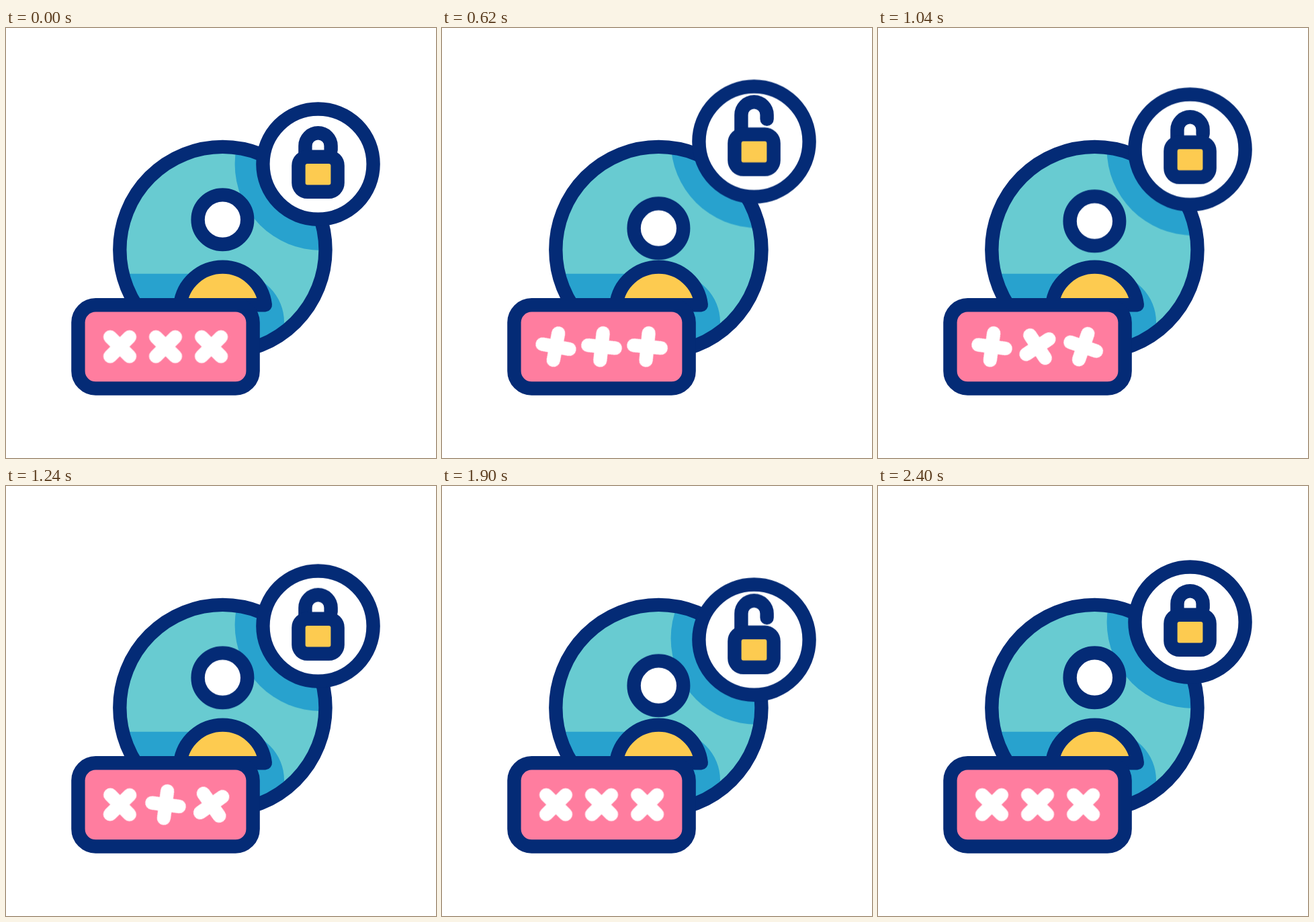
These frames come from a looping animation (640 px wide and 640 px high, 2620 ms). An HTML page:

```html
<!DOCTYPE html>
<html lang="en">
<head>
<meta charset="utf-8">
<title>Account lock</title>
<style>
  html, body { margin: 0; width: 100%; height: 100%; overflow: hidden; background: #fff; }
  svg { display: block; width: 100vw; height: 100vh; }

  .line { stroke: #042b76; stroke-width: 20.4; stroke-linejoin: round; stroke-linecap: round; }
  .teal { fill: #68cbd1; }
  .blue { fill: #28a2ce; }
  .gold { fill: #fdcb50; }
  .pink { fill: #ff7d9f; }
  .white { fill: #fff; }
  .none { fill: none; }
  .cross { fill: none; stroke: #fff; stroke-width: 20.4; stroke-linecap: round; }

  /* 2400 ms of motion, then a 220 ms rest */
  .bob, .hop, .spin {
    animation: 2620ms cubic-bezier(.33333, 0, .66667, 1) infinite;
  }
  .bob { animation-name: bob; --low: 38.4px; }
  .shade { --low: 35.3px; }
  .hop { animation-name: hop; --rise: 12.8px; }
  .shackle { --rise: -12.8px; }
  .spin { animation-name: spin; }
  .second { animation-delay: 80ms; }
  .third { animation-delay: 160ms; }

  @keyframes bob {
    0%, 91.603%, 100% { transform: translateY(0); }
    30.534% { transform: translateY(-38.4px); }
    61.069% { transform: translateY(var(--low)); }
  }
  @keyframes hop {
    0%, 45.802%, 91.603%, 100% { transform: translateY(0); }
    22.901%, 68.702% { transform: translateY(var(--rise)); }
  }
  @keyframes spin {
    0% { transform: rotate(0deg); }
    22.901% { transform: rotate(-40deg); }
    57.252%, 100% { transform: rotate(360deg); }
  }
</style>
</head>
<body>
<svg viewBox="0 0 640 640">
  <defs>
    <clipPath id="globe"><circle cx="322.4" cy="330" r="153.2"/></clipPath>
    <path id="x" d="M-14.4-14.4 14.4 14.4M14.4-14.4-14.4 14.4"/>
  </defs>

  <g clip-path="url(#globe)">
    <circle class="teal" cx="322.4" cy="330" r="153.2"/>
    <circle class="blue bob shade" cx="469" cy="202.6" r="128.4"/>
    <rect class="blue" x="61" y="365.7" width="353" height="217" rx="72"/>
  </g>
  <circle class="line none" cx="322.4" cy="330" r="153.1"/>

  <circle class="line white hop" cx="322.4" cy="285.2" r="36.8"/>
  <path class="line gold" d="M259.2 412.2A63.7 63.7 0 0 1 385.8 412.2Z"/>

  <rect class="line pink" x="107.4" y="412.3" width="260.2" height="124.2" rx="26"/>
  <g class="cross">
    <g transform="translate(169.5 474.3)"><use href="#x" class="spin third"/></g>
    <g transform="translate(237.5 474.3)"><use href="#x" class="spin second"/></g>
    <g transform="translate(305.6 474.3)"><use href="#x" class="spin"/></g>
  </g>

  <g class="bob">
    <circle class="line white" cx="464.5" cy="202.6" r="82.1"/>
    <path class="line none hop shackle" d="M445.4 210V175.4A19.1 19.1 0 0 1 483.6 175.4V181.8"/>
    <rect class="line gold" x="435.4" y="191.7" width="58.2" height="52.1" rx="13.2"/>
  </g>
</svg>
</body>
</html>
```
